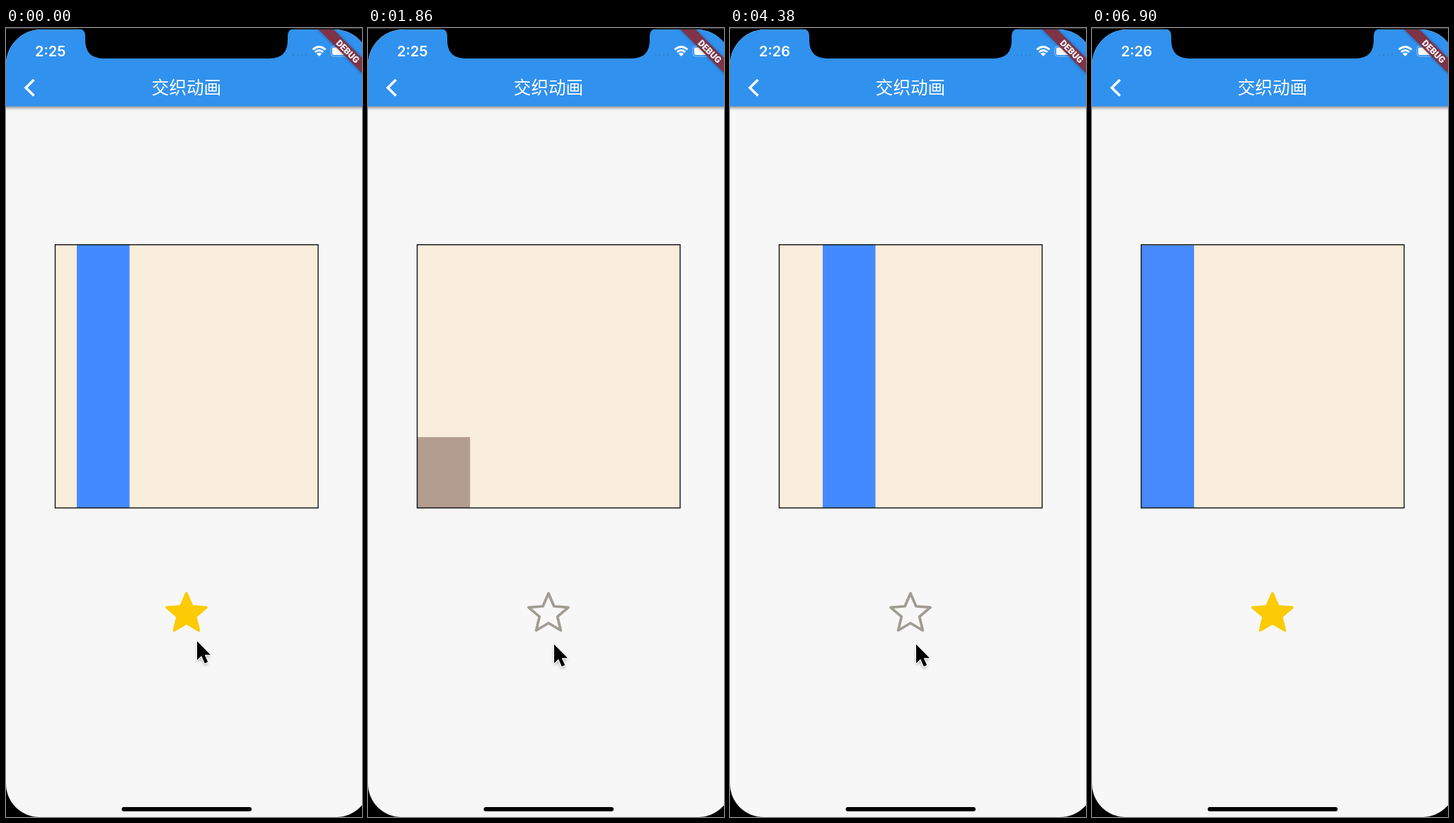
Animation of 503x1113 px, one loop 6960 ms. Source, as an HTML page:

```html
<!DOCTYPE html>
<html lang="zh">
<head>
<meta charset="utf-8">
<style>
  html, body { margin: 0; width: 100%; height: 100%; overflow: hidden; background: #000; }
  svg { display: block; width: 503px; height: 1113px; }
  text { fill: #fff; }
  .clock { font: 600 20px Inter, "Liberation Sans", sans-serif; }
  .title { font: 500 24.6px "Noto Sans CJK SC", "Noto Sans CJK", sans-serif; }
  .debug { font: 900 12.6px Roboto, Inter, sans-serif; }
  .star { stroke-width: 1.35; stroke-linejoin: round; }
</style>
</head>
<body>
<svg viewBox="0 0 503 1113">
  <defs>
    <clipPath id="screen"><rect y="2" width="514" height="1130" rx="50"/></clipPath>
    <clipPath id="base"><rect y="-60" width="514" height="1173" rx="47"/></clipPath>
    <filter id="soft" x="-50%" y="-50%" width="200%" height="200%"><feGaussianBlur stdDeviation="2"/></filter>
    <path id="starPath" d="M0 5.27L6.18 9 4.54 1.97 10-2.76 2.81-3.37 0-10-2.81-3.37-10-2.76-4.54 1.97-6.18 9Z"/>
    <path id="arrow" d="M0 0V26.5L6.2 20.8 10.8 31.2 15.2 29.2 10.7 19.2H19Z"/>
  </defs>
  <rect width="503" height="1113"/>
  <rect width="503" height="1.5" fill="#2b2b2b"/>
  <g clip-path="url(#screen)"><g clip-path="url(#base)">
    <rect width="503" height="1113" fill="#f7f7f7"/>
    <rect x="-10" y="60" width="523" height="53" fill="#000" opacity=".4" filter="url(#soft)"/>
    <rect width="503" height="110.5" fill="#3191ee"/>
    <g fill="#000" opacity=".08">
      <circle cx="406" cy="38" r="1.5"/><circle cx="412" cy="38" r="1.5"/>
      <circle cx="418" cy="38" r="1.5"/><circle cx="424" cy="38" r="1.5"/>
    </g>
    <text id="clock" class="clock" x="41" y="40">2:25</text>
    <text class="title" x="255" y="92.5" text-anchor="middle">交织动画</text>
    <path d="M39.5 73L28 84.2 39.5 95.5" fill="none" stroke="#fff" stroke-width="3.5"/>
    <g fill="none" stroke="#fff" stroke-width="2.8">
      <path d="M433.5 30.5Q442.500 22.500 451.500 30.500"/>
      <path d="M436.700 34Q442.500 29 448.300 34"/>
    </g>
    <path d="M438.800 36.200Q442.500 33.500 446.200 36.200L442.500 40Z" fill="#fff"/>
    <rect x="459" y="25.500" width="25" height="14.500" rx="4" fill="none" stroke="#fff" stroke-opacity=".45"/>
    <rect x="461" y="27.500" width="18" height="10.500" rx="2" fill="#fff"/>
    <g transform="translate(483 33) rotate(45)">
      <rect x="-60" y="-7.500" width="120" height="15" fill="#000" opacity=".35" filter="url(#soft)"/>
      <rect x="-60" y="-7.500" width="120" height="15" fill="#7e3347"/>
      <text class="debug" y="4.500" text-anchor="middle">DEBUG</text>
    </g>
    <rect x="69.500" y="305.700" width="371.500" height="371.300" fill="#f9eddc"/>
    <rect id="bar" width="74.500"/>
    <rect x="69.500" y="305.700" width="371.500" height="371.300" fill="none" stroke="#111" stroke-width="1.400"/>
    <circle id="ripple" fill="#bcbcbc"/>
    <use id="gold" class="star" href="#starPath" fill="#fccb05" stroke="#fccb05"/>
    <use id="hollow" class="star" href="#starPath" fill="none" stroke="#a09c94"/>
  </g></g>
  <path d="M102 0Q112 2 112 11V17Q112 43 138 43H372Q398 43 398 17V11Q398 2 408 0Z"/>
  <rect x="163.500" y="1099" width="183.500" height="6" rx="3"/>
  <g id="cursor">
    <use href="#arrow" y="3" opacity=".35" filter="url(#soft)"/>
    <use href="#arrow" stroke="#fff" stroke-width="2.400" stroke-linejoin="round"/>
    <use href="#arrow"/>
  </g>
</svg>
<script>
const LOOP = 6960, STEP = 60;
const HALF = 1800, RISE = 1080, SLIDE = 1090, REACH = 186;
const BAR_START = 1352;
const TAPS = [840, 1920, 2960, 4960];
const SWITCH_DELAY = 130, SWITCH = 300;
const ORANGE = [255, 171, 64], BLUE = [68, 138, 255];
// time, x, y of the pointer tip
const POINTER = [
  [0, 270, 865], [240, 263, 869.5], [5820, 263, 869.5],
  [6240, 230, 884], [6420, 205, 1125], [6960, 205, 1125]
];

const el = id => document.getElementById(id);
const clamp = v => Math.min(1, Math.max(0, v));
const mix = (a, b, p) => a + (b - a) * p;
const set = (node, attrs) => {
  for (const k in attrs) node.setAttribute(k, attrs[k]);
};

// cubic-bezier(.42, 0, .58, 1)
function easeInOut(x) {
  let lo = 0, hi = 1, s = .5;
  for (let i = 0; i < 24; i++) {
    s = (lo + hi) / 2;
    const bx = 1.26 * s * (1 - s) ** 2 + 1.74 * s * s * (1 - s) + s ** 3;
    if (bx < x) lo = s; else hi = s;
  }
  return s * s * (3 - 2 * s);
}

function drawBar(t) {
  const phase = (t + BAR_START) % (2 * HALF);
  const at = phase < HALF ? phase : 2 * HALF - phase;
  const x = clamp(at / RISE);
  const height = 371 * easeInOut(x);
  const slide = clamp((at - SLIDE) / (HALF - SLIDE));
  const tint = 1 - (1 - x) ** 1.2;
  const rgb = ORANGE.map((c, i) => Math.round(mix(c, BLUE[i], tint)));
  set(el("bar"), {
    x: 69.7 + REACH * (1 - Math.cos(slide * Math.PI / 2)),
    y: 677 - height,
    height,
    fill: `rgb(${rgb})`
  });
}

function drawIcon(node, scale, opacity) {
  set(node, { transform: `translate(255 825) scale(${2.8 * scale} ${2.75 * scale})`, opacity });
}

function drawStar(t) {
  let liked = true, p = 1;
  for (const tap of TAPS) {
    const begin = tap + SWITCH_DELAY;
    if (t < begin) break;
    liked = !liked;
    p = clamp((t - begin) / SWITCH);
  }
  const grow = p ** 1.2, shrink = (1 - p) ** 2;
  const [next, prev] = liked ? ["gold", "hollow"] : ["hollow", "gold"];
  drawIcon(el(next), grow, p);
  drawIcon(el(prev), shrink, 1 - p);
}

function drawRipple(t) {
  const tap = TAPS.find(s => t >= s && t < s + 270);
  const p = tap === undefined ? 1 : (t - tap) / 270;
  const v = 1 - (1 - p) ** 2;
  set(el("ripple"), {
    cx: mix(263, 255, v),
    cy: mix(870, 824, v),
    r: mix(26, 84, v),
    opacity: .25 * clamp(p * 4) * clamp((1 - p) * 2)
  });
}

function drawPointer(t) {
  const i = POINTER.findIndex((k, n) => n && t < k[0]);
  const a = POINTER[i - 1], b = POINTER[i];
  const p = (t - a[0]) / (b[0] - a[0]);
  set(el("cursor"), { transform: `translate(${mix(a[1], b[1], p)} ${mix(a[2], b[2], p)})` });
}

const start = performance.now();
function frame() {
  const now = Math.max(0, performance.now() - start) % LOOP;
  const t = Math.floor(now / STEP) * STEP;
  el("clock").textContent = t < 3000 ? "2:25" : "2:26";
  drawBar(t);
  drawStar(t);
  drawRipple(t);
  drawPointer(t);
  requestAnimationFrame(frame);
}
frame();
</script>
</body>
</html>
```
